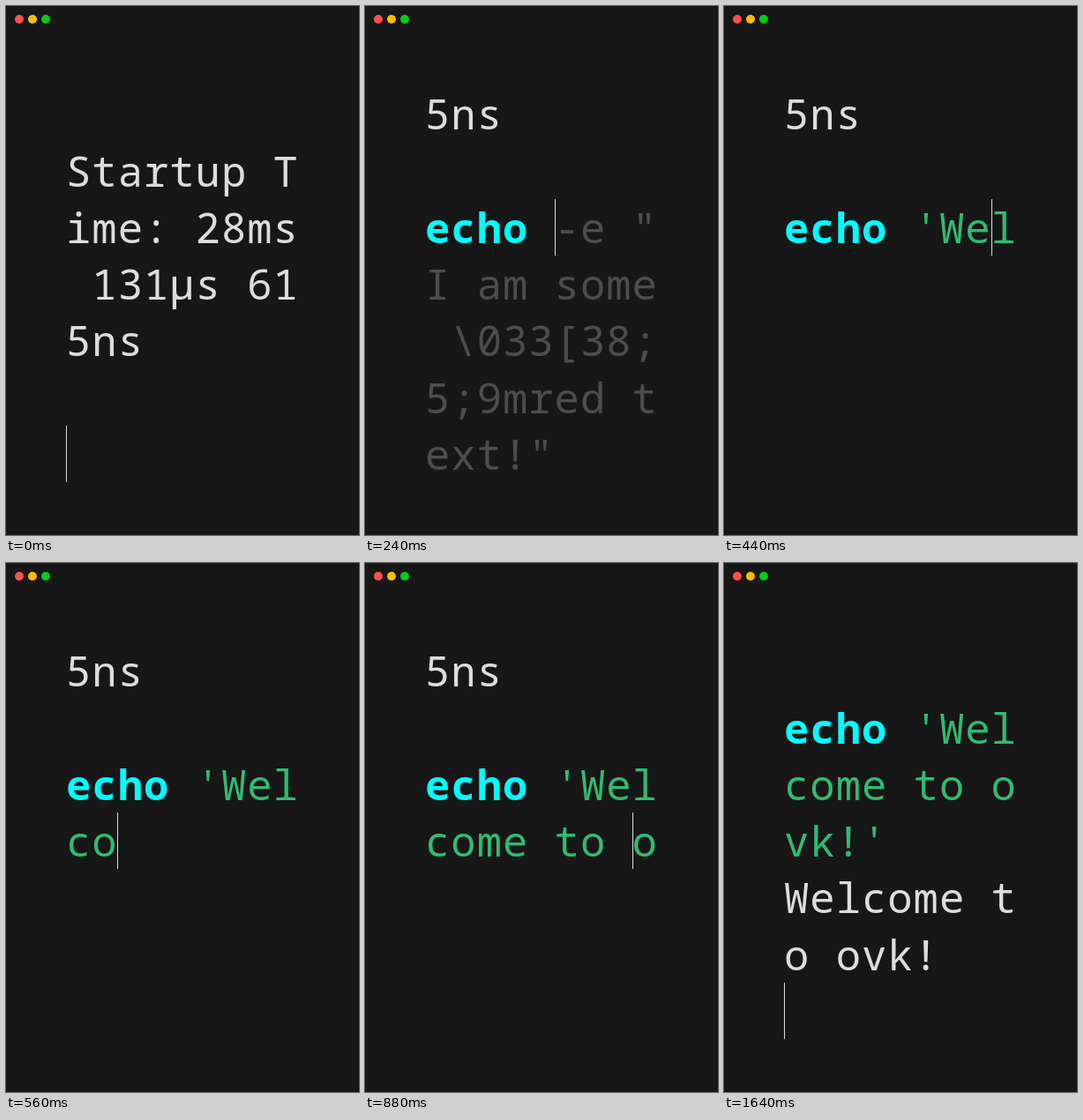
An HTML page for the animation above (6520 ms loop, 400x600 px).

```html
<!DOCTYPE html>
<html lang="en">
<head>
<meta charset="utf-8">
<title>Terminal</title>
<style>
  html, body { margin: 0; width: 100%; height: 100%; overflow: hidden; background: #171717; }
  svg { display: block; }
  text {
    font: 47px "Noto Sans Mono", monospace;
    letter-spacing: 1px;
    white-space: pre;
    fill: #ddd;
  }
  .partial { fill: #04d7d7; }
  .command { fill: #00fefe; font-weight: bold; }
  .string { fill: #31bb71; }
  .hint { fill: #4d4d4d; }
</style>
</head>
<body>
<svg width="400" height="600" viewBox="0 0 400 600">
  <rect width="400" height="600" fill="#171717"/>
  <circle cx="15" cy="15" r="5" fill="#ff4f4d"/>
  <circle cx="30" cy="15" r="5" fill="#febb00"/>
  <circle cx="45" cy="15" r="5" fill="#00cc1d"/>
  <g id="screen"></g>
  <rect id="cursor" width="1" height="64" fill="#ddd"/>
</svg>
<script>
const LOOP = 6520, TICK = 40, ENTER = 1640;
const COLS = 9, CELL_W = 29.2, CELL_H = 64, BASELINE = 50;
const LEFT = 68, TOP = 90, SCALE = 450 / 448;

const BANNER = "Startup Time: 28ms 131µs 615ns";
const GREETING = "Welcome to ovk!";
const COMMAND = `echo '${GREETING}'`;
const HISTORY = String.raw`echo -e "I am some \033[38;5;9mred text!"`;

const screen = document.getElementById("screen");
const cursor = document.getElementById("cursor");
screen.setAttribute("transform", `translate(${LEFT} ${TOP}) scale(${SCALE})`);

function drawRun(row, col, string, style) {
  const text = document.createElementNS("http://www.w3.org/2000/svg", "text");
  text.setAttribute("x", col * CELL_W);
  text.setAttribute("y", row * CELL_H + BASELINE);
  text.setAttribute("class", style);
  text.textContent = string;
  screen.append(text);
}

// Prints a styled run starting at a cell offset, wrapping at the last column.
function print(row, offset, string, style = "") {
  while (string) {
    const col = offset % COLS;
    const part = string.slice(0, COLS - col);
    drawRun(row + Math.floor(offset / COLS), col, part, style);
    offset += part.length;
    string = string.slice(part.length);
  }
}

function printCommand(row, count) {
  const name = COMMAND.slice(0, Math.min(count, 4));
  print(row, 0, name, count < 4 ? "partial" : "command");
  print(row, 5, COMMAND.slice(5, count), "string");
}

function moveCursor(row, col) {
  cursor.setAttribute("x", Math.round(LEFT + Math.round(col * CELL_W) * SCALE));
  cursor.setAttribute("y", Math.round(TOP + row * CELL_H * SCALE));
}

// A key lands on four ticks out of five.
function typedCount(time) {
  const tick = Math.floor(time / TICK);
  return Math.min(tick - Math.floor((tick + 2) / 5), COMMAND.length);
}

function drawPrompt(count) {
  if (count === 0) {
    print(1, 0, BANNER);
    moveCursor(6, 0);
    return;
  }
  print(0, 0, BANNER.slice(-3));
  printCommand(2, count);
  if (HISTORY.startsWith(COMMAND.slice(0, count))) {
    print(2, count, HISTORY.slice(count), "hint");
  }
  // The cursor rests on a full row's last cell until the next key.
  const full = count % COLS === 0;
  const cell = full ? count - 1 : count;
  moveCursor(2 + Math.floor(cell / COLS), cell % COLS);
}

function drawResult() {
  printCommand(1, COMMAND.length);
  print(4, 0, GREETING);
  moveCursor(6, 0);
}

let shown = null;
function render(time) {
  const state = time >= ENTER ? "done" : typedCount(time);
  if (state === shown) return;
  shown = state;
  screen.replaceChildren();
  if (state === "done") drawResult();
  else drawPrompt(state);
}

const start = performance.now();
function frame() {
  render((performance.now() - start) % LOOP);
  requestAnimationFrame(frame);
}
frame();
</script>
</body>
</html>
```
